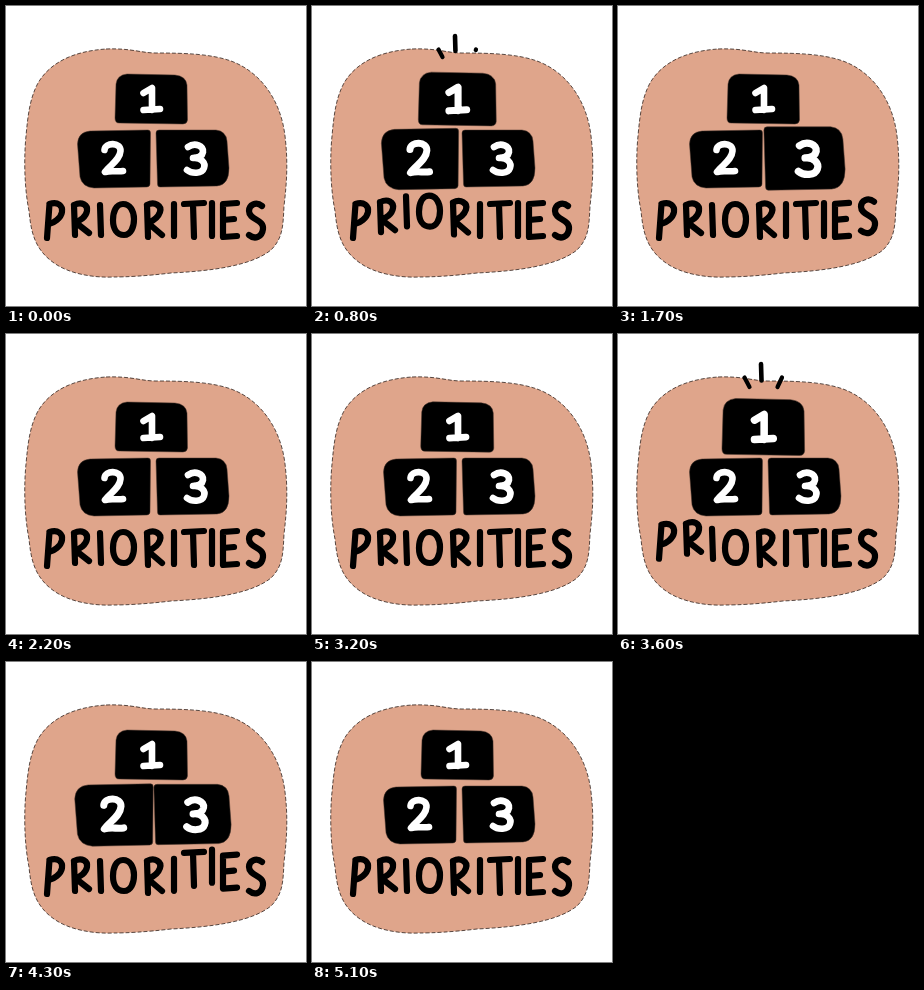
These frames come from a looping animation (300 px wide and 300 px high, 6.1 s). An HTML page:

```html
<!DOCTYPE html>
<html lang="en">
<head>
<meta charset="utf-8">
<title>Priorities</title>
<style>
  html, body { margin: 0; width: 100%; height: 100%; overflow: hidden; background: #fff; }
  svg { display: block; width: 100%; height: 100%; }
  .stroke { fill: none; stroke: #000; stroke-linecap: round; stroke-linejoin: round; }
</style>
</head>
<body>
<svg id="stage" viewBox="0 0 300 300" role="img" aria-label="1 2 3 PRIORITIES">
  <path fill="#dfa58b" stroke="#30231e" stroke-width=".8" stroke-dasharray="4 2" d="M100 43C125 42 135 47 150 47C180 47 205 48 225 55C255 66 275 95 279 130C282 155 281 175 278 200C277 220 277 232 265 244C245 260 205 265 165 267C140 270 120 271 108 271C85 272 62 267 48 257C28 243 25 225 23 205C18 180 18 150 20 130C22 108 24 92 32 77C45 55 70 45 100 43Z"/>
</svg>
<script>
const LOOP = 6100, PASS = 3000, STEP = 100;
const stage = document.getElementById('stage');

function add(parent, tag, attributes) {
  const node = document.createElementNS('http://www.w3.org/2000/svg', tag);
  for (const name in attributes) node.setAttribute(name, attributes[name]);
  return parent.appendChild(node);
}
const clamp = x => Math.max(0, Math.min(1, x));
const ease = x => Math.sin(clamp(x) * Math.PI / 2) ** 2;
const progress = (time, from, to) => clamp((time - from) / (to - from));

// Podium blocks, each popping half a second after the previous one
const blocks = [
  { start: 150, x: 145, y: 93,
    shape: 'M121 68L169 69Q180 70 181 79L181.500 114Q181 118 177 118L113 117Q109 117 109 112L110 78Q111 69 121 68Z',
    digit: 'M137.500 87L146 82V104M137.500 104L154 103' },
  { start: 650, x: 108, y: 153,
    shape: 'M84 125L142 124Q144.500 124 144.500 127L144 178Q144 180.500 141 181L88 182Q76 181 74 171L71.500 138Q72 126 84 125Z',
    digit: 'M98.500 144C99 136 115 136 114.500 145C114 154 104 159 99 166C105 164 111 166 117 165' },
  { start: 1150, x: 186.5, y: 152.5,
    shape: 'M153 124L210 124Q220 125 221 135L223 162Q223 179 211 180L154 181Q151.500 181 151.500 178L150 127Q150 124 153 124Z',
    digit: 'M182 141C189 136 198 140 197 146C196 151 191 152 187 152C195 151 200 157 198 162C196 168 186 168 181 164' }
];
for (const block of blocks) {
  block.node = add(stage, 'g');
  add(block.node, 'path', { d: block.shape, stroke: '#49372f', 'stroke-width': .5 });
  add(block.node, 'path', { d: block.digit, class: 'stroke', style: 'stroke:#fff;stroke-width:6.6' });
}

// Hand lettering
const letters = [
  'M43.500 198L41 232M43.500 198C52 195 57 200 56 206C55 212 48 217 43 218',
  'M68 199L69 229M68 199C76 195 82 199 81 205C80 211 74 215 69 216L83 227',
  'M94 199L95 229',
  'M117 198C110 198 107 206 107 214C107 223 111 229 118 229C125 229 128 221 128 213C128 205 124 198 117 198Z',
  'M141 199L142 231M141 199C149 195 156 200 154 206C152 212 147 215 142 217L156 229',
  'M168 198L168 230',
  'M178 198L198 197M187 198L188 231',
  'M206 197L206 230',
  'M231 197L217 198L217 231L231 230M217 214L228 213',
  'M256 200C250 195 243 199 243 205C243 214 258 213 257 223C256 231 249 234 243 229'
].map(d => add(stage, 'path', { d, class: 'stroke', 'stroke-width': 6.2 }));

// Sparks run from their inner end to their outer end
const sparks = [
  { inner: [131.5, 53], outer: [126.5, 43.5], fade: [760, 960], width: 4.2 },
  { inner: [143.5, 46.5], outer: [143, 30], fade: [780, 980], width: 4.6 },
  { inner: [159.5, 53], outer: [164, 43.5], fade: [620, 810], width: 4.2 }
];
for (const spark of sparks) {
  spark.node = add(stage, 'path', { class: 'stroke', 'stroke-width': spark.width });
}

function draw(time) {
  for (const { node, start, x, y } of blocks) {
    const age = time - start;
    const pop = age < 350 ? ease(age / 350) : 1 - ease((age - 350) / 600);
    node.setAttribute('transform', `translate(${x} ${y}) scale(${1 + .15 * pop}) translate(${-x} ${-y})`);
  }
  letters.forEach((letter, i) => {
    const distance = Math.abs(time - 513 - 116 * i) / 270;
    letter.setAttribute('transform', `translate(0 ${-9.5 * (1 - ease(distance))})`);
  });
  for (const { node, inner, outer, fade } of sparks) {
    const head = progress(time, 250, 500), tail = progress(time, ...fade);
    const point = p => inner.map((v, i) => v + (outer[i] - v) * p).join(' ');
    node.setAttribute('d', `M${point(tail)}L${point(head)}`);
    node.setAttribute('visibility', head > 0 && tail < 1 ? 'visible' : 'hidden');
  }
}

const began = performance.now();
function tick() {
  const time = (performance.now() - began) % LOOP;
  draw(Math.floor((time < PASS + STEP ? time : time - PASS) / STEP) * STEP);
  requestAnimationFrame(tick);
}
tick();
</script>
</body>
</html>
```
